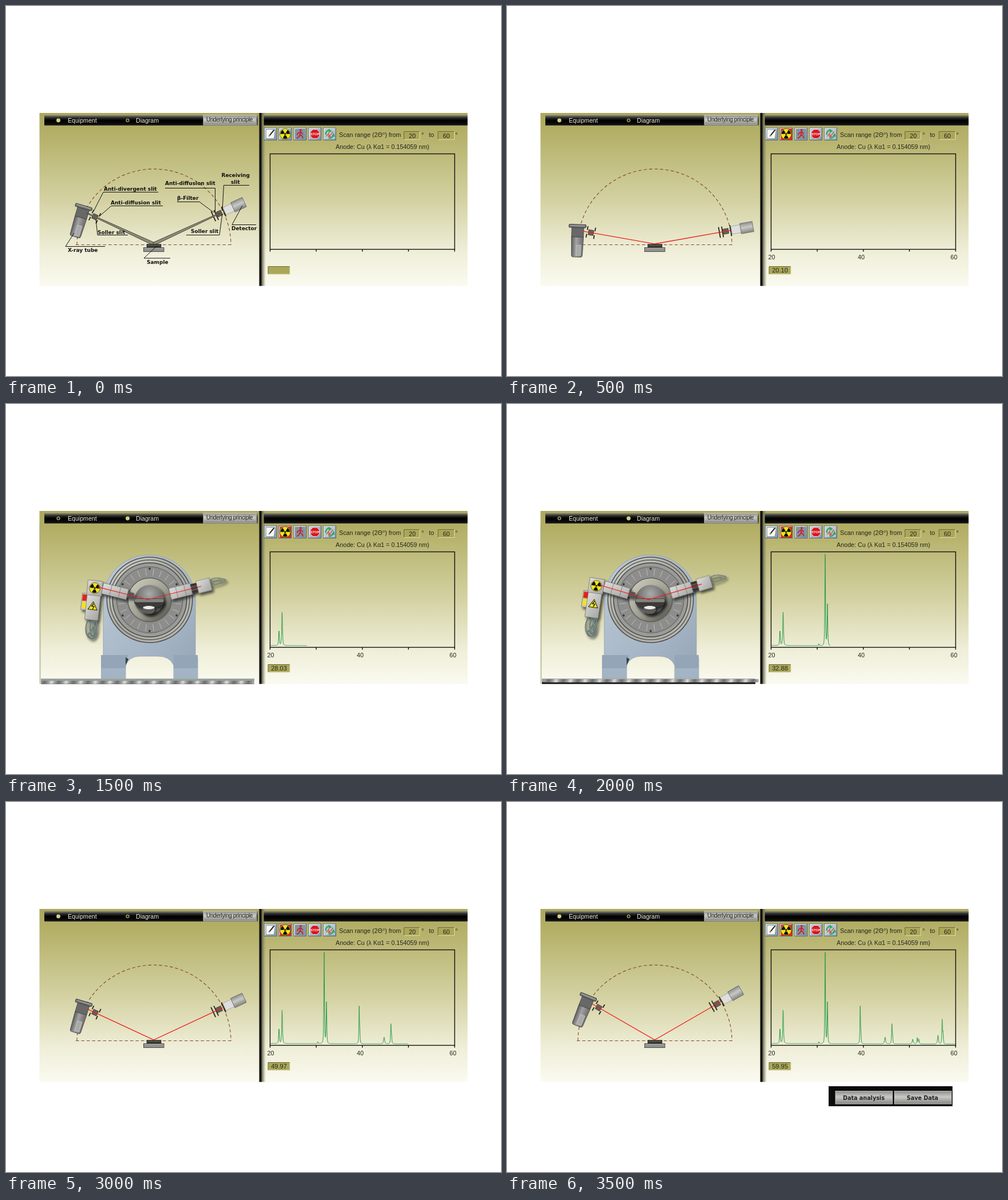
An HTML page that plays this animation: 865x647 px, repeating every 4 s.

```html
<!DOCTYPE html>
<html lang="en">
<head>
<meta charset="utf-8">
<title>Powder diffraction scan</title>
<style>
html,body{margin:0;width:100%;height:100%;overflow:hidden;background:#fff}
svg{display:block;width:865px;height:647px}
text{font-family:"Liberation Sans",Arial,sans-serif;font-size:10.75px;fill:#25251c}
.lab text,.foot text{font-family:"DejaVu Sans",Verdana,sans-serif;font-weight:bold;font-size:9px;fill:#111}
.lab path{fill:none;stroke:#111}
.foot text{font-size:9.6px;fill:#222}
.bar text{font-size:10.6px;fill:#f0efe2}
</style>
</head>
<body>
<svg id="stage" viewBox="0 0 865 647" xmlns="http://www.w3.org/2000/svg">
<defs>
<linearGradient id="bg" x2="0" y2="1"><stop stop-color="#aca75c"/><stop offset=".12" stop-color="#b4b068"/><stop offset=".5" stop-color="#d3d1a1"/><stop offset=".8" stop-color="#efeed8"/><stop offset="1" stop-color="#fafaf0"/></linearGradient>
<linearGradient id="black" x2="0" y2="1"><stop stop-color="#85857a"/><stop offset=".25" stop-color="#2c2c2a"/><stop offset=".5" stop-color="#000"/><stop offset=".85" stop-color="#0c0c0c"/><stop offset="1" stop-color="#33332e"/></linearGradient>
<linearGradient id="steel" x2="0" y2="1"><stop stop-color="#8f8f8d"/><stop offset=".45" stop-color="#c9c9c6"/><stop offset="1" stop-color="#858583"/></linearGradient>
<linearGradient id="edge"><stop stop-color="#4e4e40"/><stop offset=".4" stop-color="#77775e" stop-opacity=".7"/><stop offset="1" stop-color="#99996a" stop-opacity="0"/></linearGradient>
<linearGradient id="metal"><stop stop-color="#5c5c5c"/><stop offset=".4" stop-color="#a2a2a2"/><stop offset="1" stop-color="#6d6d6d"/></linearGradient>
<linearGradient id="box" x2="1" y2="1"><stop stop-color="#dededb"/><stop offset="1" stop-color="#a5a5a4"/></linearGradient>
<linearGradient id="body" x2="1" y2="1"><stop stop-color="#bccad6"/><stop offset=".6" stop-color="#a7b6c6"/><stop offset="1" stop-color="#94a4b5"/></linearGradient>
<linearGradient id="key" x2="1" y2="1"><stop stop-color="#c3d2df"/><stop offset="1" stop-color="#7f97ad"/></linearGradient>
<linearGradient id="hub" x2="1" y2="1"><stop offset=".1" stop-color="#c9c7b6"/><stop offset=".55" stop-color="#a09f93"/><stop offset=".9" stop-color="#5d5c55"/></linearGradient>
<linearGradient id="rim" x2="1" y2="1"><stop stop-color="#d2d2cc"/><stop offset=".5" stop-color="#a8a8a3"/><stop offset="1" stop-color="#bdbdb7"/></linearGradient>
<radialGradient id="knob" cy=".3"><stop stop-color="#ababa9"/><stop offset="1" stop-color="#686867"/></radialGradient>
<linearGradient id="wave" gradientUnits="userSpaceOnUse" x1="61" x2="73" y2="3" spreadMethod="reflect"><stop stop-color="#6f6a70"/><stop offset=".55" stop-color="#9c9a9c"/><stop offset="1" stop-color="#dededc"/></linearGradient>
<filter id="cast" x="-30%" y="-30%" width="170%" height="170%"><feDropShadow dx="3" dy="3.5" stdDeviation="2" flood-color="#14140a" flood-opacity=".75"/></filter>
</defs>
</svg>
<script>
const stage = document.getElementById('stage');
const rect = (x, y, w, h, fill, more = '') =>
  `<rect x="${x}" y="${y}" width="${w}" height="${h}" fill="${fill}" ${more}/>`;
const circ = (x, y, r, fill, more = '') => `<circle cx="${x}" cy="${y}" r="${r}" fill="${fill}" ${more}/>`;
const path = (d, fill, more = '') => `<path d="${d}" fill="${fill}" ${more}/>`;
const line = (d, color, w = 1, more = '') => path(d, 'none', `stroke="${color}" stroke-width="${w}" ${more}`);
const text = (x, y, s, more = '') => `<text x="${x}" y="${y}" ${more}>${s}</text>`;
const g = (inner, more = '') => `<g ${more}>${inner}</g>`;
const at = (x, y, a, inner) => g(inner, `transform="translate(${x} ${y}) rotate(${a})"`);
const INK = 'stroke="#444" stroke-width=".8"';
const THIN = 'stroke="#666" stroke-width=".6"';

function trefoil(r) {
  let s = circ(0, 0, r, '#f4e512', 'stroke="#222" stroke-width=".6"');
  for (let i = 0; i < 3; i++) {
    const p = a => `${(r * .88 * Math.cos(a)).toFixed(2)} ${(r * .88 * Math.sin(a)).toFixed(2)}`;
    const a = Math.PI * (2 * i / 3);
    s += path(`M0 0L${p(a - Math.PI / 3)}A${r * .88} ${r * .88} 0 0 1 ${p(a)}Z`, '#111');
  }
  return s + circ(0, 0, r * .22, '#111', `stroke="#f4e512" stroke-width="${r * .1}"`);
}

const field = (x, y, w, h) => rect(x, y, w, h, '#aaa758') +
  line(`M${x} ${y + h}V${y}H${x + w}`, '#6b6934') + line(`M${x} ${y + h}H${x + w}V${y}`, '#dedbb0');

const key = (x, inner, id = '') => g(
  rect(x, 213, 21.5, 21.5, 'url(#key)', `stroke="#52667a" ${id}`) +
  line(`M${x + 1} 233.5V214H${x + 20.5}`, '#e6eef4', 1.2) + at(x + 10.8, 223.8, 0, inner));

function frame() {
  let s = rect(58.5, 187, 748, 302.5, 'url(#bg)') +
    rect(67, 191, 373, 18, 'url(#black)') + line('M438.5 191V209', '#aaa') +
    rect(345, 191, 92, 17, 'url(#steel)', 'stroke="#e0e0dc" stroke-width=".8"') +
    text(350, 202, 'Underlying principle', 'style="font-size:10px;letter-spacing:-.34px"') +
    rect(446, 187, 8, 302.5, 'url(#edge)') + rect(442.5, 187, 3.8, 302.5, '#11110d') +
    rect(450.5, 191, 356, 18, 'url(#black)') +
    g(text(108, 204, 'Equipment') + text(227, 204, 'Diagram'), 'class="bar"');
  s += key(451.5, path('M-8 -8H4L8 -6L6 8H-8Z', '#f7f7f4', 'stroke="#666" stroke-width=".6"') +
      line('M-3 4L6 -7', '#222', 2) + line('M-3 4L-1 2', '#c9a840', 1.5)) +
    key(477, trefoil(9.4), 'id="live"') +
    key(503, rect(-9, -9, 18, 18, '#8292a1') + circ(1, -7, 1.9, '#c8242a') +
      line('M1 -5L0 1L4 4L5 8M0 1L-2 5L-6 8M1 -4L-4 -1L-5 2M1 -4L5 0', '#c8242a', 1.8)) +
    key(529, path('M-3.4 -8H3.4L8 -3.4V3.4L3.4 8H-3.4L-8 3.4V-3.4Z', '#d9161c', 'stroke="#fff" stroke-width=".8"') +
      text(0, 2, 'STOP', 'text-anchor="middle" style="font-size:5.6px;font-weight:bold;fill:#fff"')) +
    key(555, rect(-8.5, -8.5, 17, 17, '#bccbd0') +
      line('M-7 1A7 7 0 0 1 0 -7M-2 7A7 7 0 0 0 6 3', '#34a565', 2.4) +
      path('M-2 -9L4 -5L-2 -2ZM3 4L7 -2L9 5Z', '#34a565') +
      line('M6 -4L1 2M-6 4L-1 -2', '#d05a4d', 1.7) + path('M-2 0L3 5L-3 6Z', '#d05a4d'));
  s += text(582, 229, 'Scan range (2Θ°) from') + field(695.5, 219.5, 27.5, 14) + text(704, 230.5, '20') +
    text(726, 229, '°') + text(739, 229, 'to') + field(755, 219.5, 28.5, 14) + text(763.5, 230.5, '60') +
    text(785, 229, '°') + text(576, 250, 'Anode: Cu (λ Kα1 = 0.154059 nm)') +
    rect(461.5, 258.5, 322.5, 167, 'none', 'stroke="#111" stroke-width="1.4"');
  for (let i = 0; i < 5; i++) s += line(`M${461.5 + i * 80.6} 425V429.5`, '#111', 1.4);
  s += g(text(456.5, 442.5, '20') + text(613, 442.5, '40') + text(775, 442.5, '60'), 'id="scale" style="letter-spacing:.1px"') +
    field(458, 455.5, 38, 13.5) + text(477, 466, '', 'id="value" text-anchor="middle" style="font-size:11px"') +
    line('', '#2a9c4c', 1, 'id="curve" stroke-linejoin="round"');
  return s;
}

// Paired slit blades above and below the beam
const blades = x => line(`M${x} -10V-3.5M${x} 3.5V10`, '#1c1c12', 1.7);
const baffle = x => rect(x - 4.5, -4.5, 9, 9, '#66605c', 'stroke="#333" stroke-width=".7"');

function optics() {
  const tube = at(-138, -7, -8,
    rect(-10, 2, 21, 17, '#686868', INK) +
    path('M-10 19H11L10 51Q10 54 7 54H-6Q-9 54 -9 51Z', 'url(#metal)', INK) +
    rect(-1, 33, 8, 18, '#aaa', 'stroke="#ccc" stroke-width=".7"') +
    rect(-15, -3, 30, 5.5, '#777', 'rx="2" stroke="#3c3c3c"') + line('M-13 -1H13', '#b5b5b5'));
  const left = g(tube + blades(-120) + baffle(-113) + blades(-106.5), 'id="src"');
  const right = g(line('M115 -9.5V9.5M120.5 -9.5V9.5M135 -9.5V9.5', '#1c1c12', 1.7) + baffle(126.5) +
    rect(136.5, -7, 17, 14, '#dedede', 'stroke="#999" stroke-width=".7"') +
    rect(152.5, -9, 22, 18, 'url(#steel)', 'stroke="#666" stroke-width=".8"'), 'id="det"');
  const wedge = side => path(`M${-128 * side} -.8L0 -2.6V2.6L${-128 * side} .8Z`, '#8d8c78', 'stroke="#3b3a30" stroke-width=".8"');
  return line('M124 417.5A134.5 132.5 0 0 1 393 417.5M122 417.5H397', '#84452f', 1.1, 'stroke-dasharray="5.5 4"') +
    at(258, 416, 0, left + right +
      g(g(wedge(1), 'id="w1"') + g(wedge(-1), 'id="w2"'), 'id="wedge"') +
      line('', '#f21c1c', 1.3, 'id="ray"')) +
    rect(246, 416.5, 25, 6.5, '#39382f', 'stroke="#222" stroke-width=".6"') + line('M248 418.5H269', '#77766a', .8) +
    rect(240.5, 422.5, 35.5, 7, '#90908e', 'stroke="#444" stroke-width=".9"') + line('M242 424H275', '#bbb', .8);
}

function labels() {
  const t = [[171, 323, 'Anti-divergent slit'], [183, 347, 'Anti-diffusion slit'], [278, 313, 'Anti-diffusion slit'],
    [299, 339, 'β-Filter'], [376.5, 299, 'Receiving'], [393, 311, 'slit'], [394, 392, 'Detector'],
    [160, 399, 'Soller slit'], [323, 397, 'Soller slit'], [108, 430, 'X-ray tube'], [246, 451, 'Sample']];
  return t.map(a => text(...a)).join('') +
    line('M266 325.5H170L153 359M274 349.5H184L164 367M213 400.5H160L157 373M173 420.5H104L119 397' +
      'M287 441H241L264 419M278 318.5H365.5V360M299 342.5H338L363 361M425 313.5H380.5L378 358' +
      'M437 382.5H395L413 349M315 400.5H373L378 363', '#111');
}

function machine() {
  const cx = 251, cy = 342.5;
  let s = rect(61, 480, 373, 9.5, '#93a198') + rect(61, 486.5, 373, 3, '#151513') +
    g(rect(61, 484, 373, 5.5, 'url(#wave)'), 'id="ripple"') + line('M61 480.5H434', '#a9b5ac') +
    path('M170 443V341A80.5 77 0 0 1 331 341V443H335V479.5H293V457Q286 441 266 441H234Q216 441 209 457V479.5H166.5V439Z',
      'url(#body)', 'stroke="#8d9caa" stroke-width=".8"') +
    rect(166.5, 439, 42.5, 40.5, '#a3b4c5') + rect(293, 439, 42, 40.5, '#a3b4c5') +
    path('M166.5 439H213L209 462H166.5ZM293 439H335V462H293Z', '#8fa0b3', 'opacity=".75"') +
    path('M209 457L214 446L209 443Z', '#333f49');
  const rings = [[75.5, '#4c4c49'], [74, 'url(#rim)'], [70.5, '#5b5b57'], [69, 'url(#rim)'], [65.5, '#454541'], [64, '#9b9c99'],
    [58.5, '#6f706d'], [57, '#8d8e8c'], [39, '#5f5f59'], [37.5, 'url(#hub)']];
  for (const [r, c] of rings) s += circ(cx, cy, r, c);
  for (let i = 0; i < 24; i++)
    s += line('M0 -43V-55', '#c4c4c0', .8, `transform="translate(${cx} ${cy}) rotate(${i * 15 + 7.5})"`);
  for (let i = 0; i < 6; i++)
    s += g(circ(0, -54.5, 1.9, '#3c3c3a'), `transform="translate(${cx} ${cy}) rotate(${i * 60})"`);
  s += circ(250.5, 342, 25.5, 'url(#knob)', 'filter="url(#cast)"');
  const wires = 'M-4 55C-11 66 -9 84 1 88S12 74 9 56M1 56C-4 74 3 90 7 82S2 68 4 56M7 56Q4 76 -5 84';
  const head = at(-95, 3, -8,
    line(wires, '#43585a', 2.2) + line(wires, '#9db3b2', .8) +
    rect(-20.5, 11, 10, 29, '#c6c6bb', THIN) + rect(-19.5, 13, 8.5, 11, '#e3201b') + rect(-19.5, 26, 8.5, 11, '#efe12a') +
    rect(-12, 12, 23.5, 44, 'url(#box)', THIN) + rect(-13, -13, 26, 26, 'url(#box)', THIN) +
    trefoil(9.5) +
    path('M0 24L8 38H-8Z', '#f4e512', 'stroke="#222" stroke-linejoin="round"') + line('M1 27L-2 32H2L0 37', '#111', 1.3));
  const lead = 'M113 -6C120 -10 130 -7 138 -2S124 4 113 3M114 -2Q126 -5 134 -1';
  s += at(248, 342, 0,
    g(g(rect(-38, -5, 12, 10, '#555') + rect(-82, -9.5, 45, 19, 'url(#box)', THIN) +
      line('M-67 -9V9M-51 -9V9', '#777', .8) + head, 'id="armL"') +
    g(rect(76, -8, 15, 16, '#333332') + line('M78 -3H90M78 3H90', '#888') +
      rect(40, -10, 38, 20, 'url(#box)', THIN) + line('M52 -10V10M67 -10V10', '#777', .8) +
      line(lead, '#47585a', 1.6) + line(lead, '#a5b5b2', .6) +
      rect(89, -11, 24, 22, 'url(#box)', THIN), 'id="armR"'), 'filter="url(#cast)"'));
  return s + g(path('M224 343H276V347Q273 356 250 356T224 347Z', '#3b3b39') +
    path('M239 354H260V361Q258 367 249.5 367T239 361Z', '#5c5c58'), 'filter="url(#cast)"') +
    rect(224, 340.5, 52, 6.5, '#83837f', 'rx="3" stroke="#333" stroke-width=".7"') +
    `<ellipse cx="249.5" cy="356" rx="10" ry="3" fill="#ececea"/>` +
    line('M59.5 209V489', '#a5ab7c', 2, 'opacity=".7"') +
    at(248, 342, 0, line('', '#f21c1c', 1.2, 'id="ray2"'));
}

const button = (x, tx, s) => rect(x, 505.5, 99.5, 22.5, 'url(#steel)', 'stroke="#d8d8d5" stroke-width=".8"') + text(tx, 521, s);

stage.innerHTML += frame() +
  g('', 'id="dots"') + g(optics(), 'id="optics"') + g(labels(), 'id="labels" class="lab"') + g(machine(), 'id="machine"') +
  g(rect(562, 497, 216.5, 35, '#0b0b0b') + button(574, 587, 'Data analysis') + button(677, 698.5, 'Save Data'), 'id="foot" class="foot"');

const el = id => document.getElementById(id);
const show = (id, on) => el(id).setAttribute('display', on ? 'inline' : 'none');
const turn = (id, a) => el(id).setAttribute('transform', `rotate(${a})`);

// Peaks: position, height, width
const peaks = [[477, 27, .9], [482.5, 59, 1], [545, 3.5, .6], [556, 159, .8], [560, 72, .8], [617.2, 63, .75], [618.3, 18, .7],
  [660.7, 12, 1.3], [672.6, 36, .8], [673.8, 12, .7], [709, 8, 1.3], [717, 11, .9], [719.6, 8, 1], [753.2, 15, 1.3],
  [760.5, 43, .8], [762, 18, .8]];
const level = x => peaks.reduce((y, [c, h, w]) => y - h / (1 + ((x - c) / w) ** 2) ** 1.5,
  422.2 + (x - 461) * .003 + .3 * Math.sin(x * 1.9) * Math.sin(x * .37));

function trace(deg) {
  const end = 461.5 + (deg - 20) * 8.06;
  let d = 'M462 ' + level(462).toFixed(2);
  for (let x = 462.4; x < end; x += .4) d += `L${x.toFixed(1)} ${level(x).toFixed(2)}`;
  return d;
}

function ray(theta, a, b) {
  const t = theta * Math.PI / 180, c = Math.cos(t), s = Math.sin(t);
  return `M${-a * c} ${-a * s}L0 0L${b * c} ${-b * s}`;
}

const HOLD = 500;
const angles = [null, 20.1, 22.52, 28.03, 32.88, 39.98, 49.97, 59.95];
let last = -1;

function draw(ms) {
  const n = Math.floor(ms / HOLD) % angles.length;
  if (n === last) return;
  last = n;
  const deg = angles[n], on = deg !== null, rig = n === 3 || n === 4;
  const theta = on ? deg / 2 : 24.8;
  show('optics', !rig);
  show('machine', rig);
  show('labels', !on);
  show('wedge', !on);
  show('ray', on);
  show('scale', on);
  show('foot', n === 7);
  el('ripple').setAttribute('transform', n === 4 ? 'translate(6 -2.8)' : '');
  for (const id of ['src', 'w1', 'armL']) turn(id, theta);
  for (const id of ['det', 'w2', 'armR']) turn(id, -theta);
  el('ray').setAttribute('d', ray(theta, 127, 134));
  el('ray2').setAttribute('d', ray(theta, 90, 96));
  el('live').setAttribute('fill', on ? '#e8231f' : 'url(#key)');
  el('value').textContent = on ? deg.toFixed(2) : '';
  el('curve').setAttribute('d', on ? trace(deg) : '');
  const dot = (x, full) => circ(x, 200, full ? 2.9 : 2.5, full ? '#d3cd83' : 'none', 'stroke="#d3cd83" stroke-width="1.1"');
  el('dots').innerHTML = dot(91.5, !rig) + dot(212.5, rig);
}

const start = performance.now();
function tick() {
  draw(performance.now() - start);
  requestAnimationFrame(tick);
}
draw(0);
requestAnimationFrame(tick);
</script>
</body>
</html>
```
